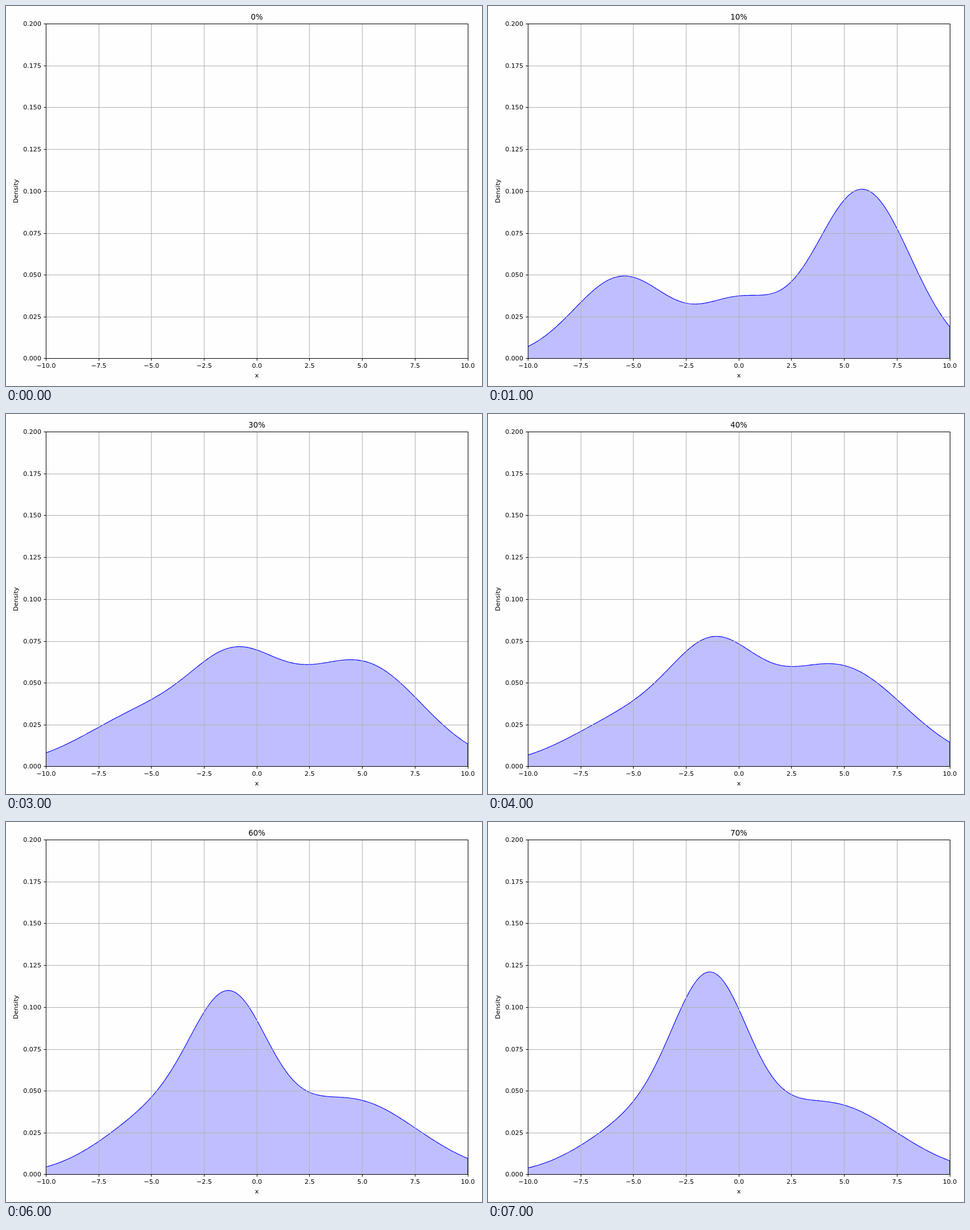
These frames come from a looping animation (837 by 669 pixels, 8 s). An HTML page with a canvas:

```html
<!DOCTYPE html>
<html lang="en">
<head>
<meta charset="utf-8">
<title>Density estimate</title>
<style>
  html, body { margin: 0; width: 100%; height: 100%; overflow: hidden; background: #fefefe; }
  canvas { display: block; }
</style>
</head>
<body>
<canvas id="chart" width="837" height="669"></canvas>
<script>
const ctx = document.getElementById('chart').getContext('2d');
const LEFT = 70.5, RIGHT = 812.5, TOP = 31.5, BASE = 620.5;
const STEP_MS = 1000, STEPS = 8;

const px = x => 70.45 + (x + 10) * 37.08;
const py = d => 620.7 - d * 2947;
const tickX = i => Math.floor(px(i * 2.5 - 10)) + 0.5;
const tickY = i => Math.min(BASE, Math.floor(621.24 - 73.745 * i) + 0.5);

// Each bump is [height in thousandths, centre, spread]
const mix = (...bumps) => x => bumps.reduce(
  (sum, [height, centre, spread]) => sum + height / 1000 * Math.exp(-((x - centre) ** 2) / (2 * spread ** 2)), 0);
const blend = (a, b, k) => x => a(x) * (1 - k) + b(x) * k;

const at10 = mix([49, -5.5, 2.3], [31, 0, 1.82], [101, 5.85, 2.27]);
const at20 = mix([39.3, -5.4, 3], [49, 0.65, 2.35], [64.5, 5.55, 2.33]);
const at40 = mix([31, -4.8, 3], [51, -1.15, 2], [60.2, 4.6, 3.2]);
const at50 = mix([43.7, -4.4, 2.75], [62, -1.05, 1.87], [48.5, 4.6, 3.2]);
const at70 = mix([34, -4.3, 2.75], [92.5, -1.3, 1.77], [42.5, 4.2, 3.2]);
const densities = [null, at10, at20, blend(at20, at40, 0.75), at40, at50, blend(at50, at70, 0.6), at70];

function drawDensity(density) {
  ctx.save();
  ctx.beginPath();
  ctx.rect(71, 31, 741, 590);
  ctx.clip();
  ctx.beginPath();
  ctx.moveTo(px(-10), py(0));
  for (let i = -200; i <= 200; i++) ctx.lineTo(px(i / 20), py(density(i / 20)));
  ctx.lineTo(px(10), py(0));
  ctx.closePath();
  ctx.fillStyle = 'rgba(0, 0, 255, 0.25)';
  ctx.fill();
  ctx.strokeStyle = '#00f';
  ctx.lineWidth = 1.11;
  ctx.stroke();
  ctx.restore();
}

function line(x1, y1, x2, y2, color) {
  ctx.strokeStyle = color;
  ctx.lineWidth = 1;
  ctx.beginPath();
  ctx.moveTo(x1, y1);
  ctx.lineTo(x2, y2);
  ctx.stroke();
}

function text(str, x, y, align = 'center', size = 11.11) {
  ctx.font = `${size}px "DejaVu Sans", sans-serif`;
  ctx.textAlign = align;
  ctx.fillStyle = '#000';
  ctx.fillText(str, x, y);
}

function drawAxes() {
  for (let i = 0; i <= 8; i++) {
    line(tickX(i), TOP, tickX(i), BASE, '#b0b0b0');
    line(LEFT, tickY(i), RIGHT, tickY(i), '#b0b0b0');
  }
  for (let i = 0; i <= 8; i++) {
    const x = i * 2.5 - 10;
    line(tickX(i), BASE, tickX(i), BASE + 4, '#000');
    line(LEFT - 4, tickY(i), LEFT, tickY(i), '#000');
    text(x.toFixed(1).replace('-', '\u2212'), px(x), 637);
    text((i * 0.025).toFixed(3), 62, tickY(i) + 3.5, 'right');
  }
  ctx.strokeRect(LEFT, TOP, RIGHT - LEFT, BASE - TOP);
  text('x', 441, 654);
  ctx.save();
  ctx.translate(21, 326);
  ctx.rotate(-Math.PI / 2);
  text('Density', 0, 0);
  ctx.restore();
}

function render() {
  const step = Math.floor(performance.now() / STEP_MS) % STEPS;
  ctx.fillStyle = '#fefefe';
  ctx.fillRect(0, 0, 837, 669);
  if (densities[step]) drawDensity(densities[step]);
  drawAxes();
  text(step * 10 + '%', 441, 24, 'center', 13.33);
  requestAnimationFrame(render);
}
render();
</script>
</body>
</html>
```
